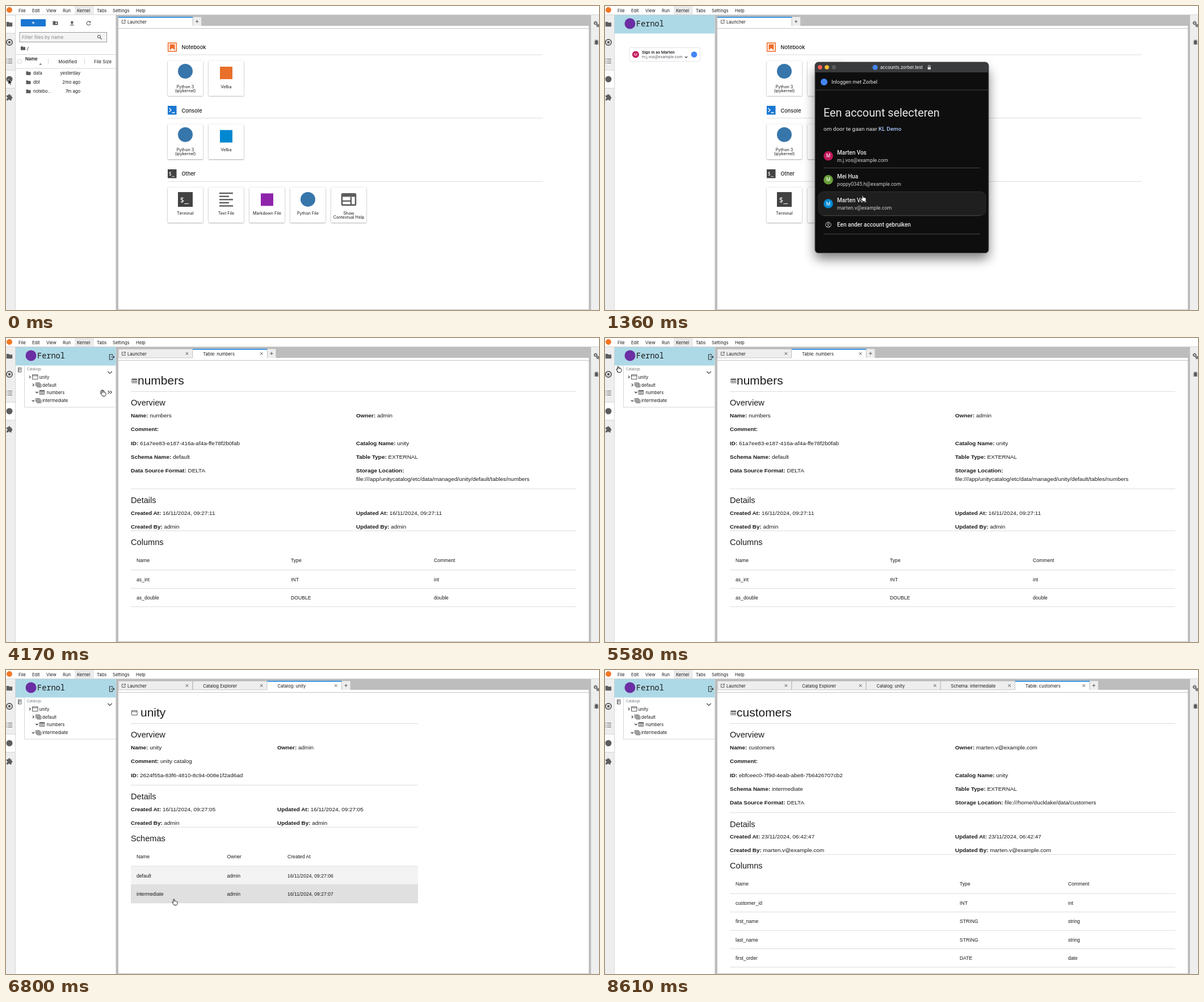
These frames come from a looping animation (1045 by 536 pixels, 8810 ms). An HTML page:

```html
<!DOCTYPE html>
<html lang="en">
<head>
<meta charset="utf-8">
<title>Catalog browser</title>
<style>
html, body { margin: 0; width: 100%; height: 100%; overflow: hidden; background: #fff; }
svg { display: block; width: 1045px; height: 536px; font-family: Inter, sans-serif; }
.doc { font-family: "Liberation Sans", Arial, sans-serif; }
.pop { font-family: Roboto, sans-serif; }
.mono { font-family: "Noto Sans Mono", monospace; }
</style>
</head>
<body>
<svg id="stage" viewBox="0 0 1045 536" xmlns="http://www.w3.org/2000/svg"></svg>
<script>
const LOOP = 8810;
const INK = '#1a1a1a', ICON = '#5c5c5c', GREY = '#bdbdbd', RULE = '#dcdcdc', BLUE = '#1976d2';
const UI = 7.65;

// y is the vertical centre of the text
const text = (x, y, s, size = UI, attrs = '') =>
  `<text x="${x}" y="${(y + size * .36).toFixed(2)}" font-size="${size}" fill="${INK}" ${attrs}>${s}</text>`;
const rect = (x, y, w, h, fill, attrs = '') =>
  `<rect x="${x}" y="${y}" width="${w}" height="${h}" fill="${fill}" ${attrs}/>`;
const dot = (x, y, r, fill, attrs = '') => `<circle cx="${x}" cy="${y}" r="${r}" fill="${fill}" ${attrs}/>`;
const line = (d, color = ICON, w = 1, attrs = '') =>
  `<path d="${d}" fill="none" stroke="${color}" stroke-width="${w}" ${attrs}/>`;
const fill = (d, color = ICON) => `<path d="${d}" fill="${color}"/>`;
const rule = (x, y, x2, color = RULE) => line(`M${x} ${y}H${x2}`, color);
const group = (body, attrs = '') => `<g ${attrs}>${body}</g>`;
const at = (x, y, body) => group(body, `transform="translate(${x} ${y})"`);
const MID = 'text-anchor="middle"', END = 'text-anchor="end"';

const folder = (x, y, k = 1) => group(
  fill('M-4.5 -3.5H-1L0 -2.4H4.5V3.6H-4.5Z'), `transform="translate(${x} ${y}) scale(${k})"`);
const chevron = (x, y, down, k = 1) =>
  at(x, y, line(down ? `M${-2.2 * k} ${-k}L0 ${1.2 * k}L${2.2 * k} ${-k}` : `M-1 -2.2L1.2 0L-1 2.2`, '#222', 1.05));
const cross = (x, y) => at(x, y, line('M-2.2 -2.2L2.2 2.2M2.2 -2.2L-2.2 2.2', '#444', .95));
const plus = (x, y, color, r = 2.6) => at(x, y, line(`M${-r} 0H${r}M0 ${-r}V${r}`, color));

const icons = {
  catalog: (x, y) => at(x, y, line('M-4.8 -4H4.8V4H-4.8ZM-4.8 -2H4.8', '#444', .9)),
  schema: (x, y) => at(x, y, line('M-4.5 2V-4H2.5M-3 3V-2.5H4', '#555', .8) +
    line('M-2 -1.5H4.8V4H-2ZM-2 .5H4.8M-2 2.3H4.8M1.4 -1.5V4', '#555', .8)),
  table: (x, y) => at(x, y, line('M-4.4 -3.4H4.4V3.6H-4.4ZM-1.5 -1.5V3.6M1.5 -1.5V3.6M-4.4 1H4.4', '#555', .8) +
    rect(-4.4, -3.6, 8.8, 2, '#555'))
};

function chrome() {
  const menu = [[22, 'File'], [46, 'Edit'], [71, 'View'], [100, 'Run'], [125, 'Kernel'], [160, 'Tabs'], [188, 'Settings'], [229, 'Help']];
  return rect(0, 0, 1045, 536, '#fff') + rect(121, 0, 34, 15, '#ebebeb') +
    dot(6, 7, 5, '#f37726') + menu.map(([x, s]) => text(x, 7.8, s)).join('') +
    rect(0, 15.5, 16.5, 521, '#eeeeee') + rect(16, 15.5, .8, 521, '#cfcfcf') +
    rect(193.5, 15.5, 4.5, 521, GREY) + rect(198, 15.5, 833, 19.5, GREY) +
    rect(1027, 15.5, 4, 521, GREY) + rect(1031, 15.5, 14, 521, '#eeeeee') +
    rule(198, 39.5, 1027, '#c4c4c4') + rule(198, 535.5, 1027, GREY) + rule(0, 15.5, 1045, '#d4d4d4');
}

const sideTab = (y, color) => rect(0, y, 16, 32, color) + rule(0, y, 16, '#d0d0d0') + rule(0, y + 32, 16, '#d0d0d0');

function sideIcons() {
  const gear = (x, y, r) => dot(x, y, r, 'none', `stroke="${ICON}" stroke-width="1.5"`) +
    dot(x, y, r + 1.1, 'none', `stroke="${ICON}" stroke-width="1" stroke-dasharray="1.2 1.4"`);
  return folder(6, 32, 1.15) +
    dot(6, 64, 5, '#fff', `stroke="${ICON}" stroke-width="2"`) + rect(3.9, 61.9, 4.2, 4.2, ICON) +
    line('M3.5 93.5H11M3.5 97H11M3.5 100.5H11', ICON, 1.2) + line('M.8 93.5H2.2M.8 97H2.2M.8 100.5H2.2', ICON, 1.2) +
    dot(6, 129, 5.5, ICON) +
    fill('M1 157.5H4A1.7 1.7 0 1 1 7.3 157.5H9.7V160A1.7 1.7 0 1 1 9.7 163.4V166.5H7A1.6 1.6 0 0 0 3.8 166.5H1V163.5A1.6 1.6 0 0 0 1 160.3Z') +
    gear(1039, 30, 2) + gear(1043, 34.5, 1.5) +
    fill('M1038 61.5Q1040.5 58.5 1043 61.5V66.5Q1040.5 70 1038 66.5Z') +
    line('M1036.5 62H1044.5M1036.5 64.5H1044.5M1036.5 67H1044.5M1038.5 59L1039.5 60.5M1042.5 59L1041.5 60.5', ICON, .9);
}

function filePanel() {
  const rows = [['data', 'yesterday'], ['dbt', '2mo ago'], ['notebo...', '7m ago']];
  return sideTab(16, '#fff') + sideTab(113, '#f8f8f8') +
    rect(26, 23.3, 44, 12.7, BLUE, 'rx="1"') + plus(48, 29.7, '#fff') +
    folder(87, 30) + plus(88.5, 30.4, '#fff', 1.6) +
    fill('M116.3 26L119.6 29.5H117.6V32H115V29.5H113ZM113 33H119.6V34.2H113Z') +
    line('M148 28.2A3.3 3.3 0 1 0 148.8 31.2', ICON, 1.1) + fill('M149.4 26.2V29.6H146Z') +
    rect(24, 46.5, 153.5, 17, '#f4f4f4', 'stroke="#9a9a9a" stroke-width="1"') +
    text(28, 55, 'Filter files by name', 8.2, 'style="fill:#858585"') +
    dot(164, 54, 2.5, 'none', `stroke="${ICON}" stroke-width="1.1"`) + line('M166 56L168.8 58.8', ICON, 1.2) +
    folder(30, 74.5, .9) + text(37, 74.5, '/', 8.5) + rule(17, 85.5, 193, '#d6d6d6') +
    rect(20.5, 94.5, 6.5, 6.5, '#fff', 'rx="1" stroke="#c8c8c8" stroke-width=".8"') +
    text(34, 93, 'Name', UI, 'font-weight="600"') + fill('M58.3 103.5H63.3L60.8 101Z') +
    text(125, 98.3, 'Modified', 7.85, END) + text(186, 98.3, 'File Size', 7.85, END) +
    line('M74.5 93V103M138.5 93V103', '#dadada') + rule(17, 110, 193, '#d6d6d6') +
    rows.map(([name, when], i) => {
      const y = 118.5 + 16 * i;
      return folder(39.5, y, .9) + text(48, y, name) + text(131, y, when, UI, END);
    }).join('');
}

const brand = () => sideTab(113, '#fff') + rect(17, 16, 176.5, 32.5, '#add8e6') +
  dot(44, 31, 9.5, '#6b2fa3') + text(55, 31.5, 'Fernol', 13.6, 'class="mono"');

const signIn = () => rect(43, 73.5, 124.5, 24, '#fff', 'rx="2" stroke="#dadce0" stroke-width=".8"') +
  dot(54, 85.5, 6, '#c2185b') + text(54, 85.6, 'M', 6.5, `${MID} style="fill:#fff"`) +
  group(text(65, 81.5, 'Sign in as Marten', 7.4, 'font-weight="500"') +
    text(65, 89.5, 'm.j.vos@example.com', 7.1, 'style="fill:#5f6368"'), 'class="pop"') +
  chevron(143, 90, true) + dot(157, 85.5, 5.3, '#4285f4');

function tree(level) {
  const bottom = [79, 108, 122][level];
  const lastY = level > 1 ? 110.5 : 96.5;
  let s = brand() + line('M187.5 31V29H182.5V38H187.5V36M185 33.5H190.5M188.5 31.3L190.8 33.5L188.5 35.7', '#333', 1.1) +
    line('M21.5 52.5H27V60H21.5ZM23 52.5V60M24.3 54.5H26M24.3 56.3H26', '#555', .9) +
    line(`M32.5 48.5V${bottom}H193`, '#d4d4d4') +
    text(37, 55.3, 'Catalogs', 6, 'style="fill:#757575"') + chevron(183, 60.5, true, 1.7) +
    chevron(42, 68.7, !level) + icons.catalog(51.3, 68.7) + text(58.5, 69, 'unity');
  if (level) s += chevron(48, 82.7, level < 2) + icons.schema(57, 82.7) + text(64, 82.8, 'default') +
    chevron(48, lastY, true) + icons.schema(57, lastY) + text(64, lastY, 'intermediate');
  if (level > 1) s += chevron(54.5, 95.7, true) + icons.table(63.5, 96) + text(71.5, 96, 'numbers');
  return s;
}

const rowTools = () => dot(170, 95.5, 3.6, 'none', 'stroke="#444" stroke-width="1"') +
  line('M168.5 94L171.5 97', '#444', .9) +
  line('M179.5 92.8L182.3 95.6L179.5 98.4M183.5 92.8L186.3 95.6L183.5 98.4', '#333', 1.1);

function tabs(names, active) {
  const all = ['Launcher', ...names];
  const end = 198 + 131.2 * all.length;
  return all.map((name, i) => {
    const x = 198 + 131.2 * i, on = i === active;
    return rect(x, 19.5, 130.7, on ? 16.5 : 15.5, on ? '#fff' : '#eeeeee', on ? '' : `stroke="${GREY}" stroke-width=".8"`) +
      (on ? rect(x, 19, 131, 1.7, '#1e88e5') : '') +
      (i ? '' : line('M207 25H204.5V30.5H210V28M207 28L210.2 24.8M208 24.7H210.3V27', '#555', .9)) +
      text(i ? x + 18 : 214, 27.8, name) + (names.length ? cross(x + 121, 27.5) : '');
  }).join('') + rect(end + .5, 19.5, 14.5, 15.5, '#eeeeee') + plus(end + 7.5, 27.3, '#555');
}

function launcher() {
  const python = dy => (x, y) => dot(x, y + dy, 13, '#3776ab');
  const badge = color => (x, y) => rect(x - 11, y - 11, 22, 22, color);
  const shell = (x, y) => rect(x - 13, y - 13.3, 26, 26, '#424242') + text(x - 9.5, y + .5, '$_', 13, 'class="mono" style="fill:#fff"');
  const lines = (x, y) => [24, 17, 24, 17, 24].map((w, i) => rect(x - 12, y - 12.5 + i * 5.6, w, 2.4, ICON)).join('');
  const help = (x, y) => rect(x - 12, y - 10, 24, 19.5, 'none', `rx="1.5" stroke="${ICON}" stroke-width="2.6"`) +
    rect(x - 12, y - 10, 24, 5, ICON) + line(`M${x - 12} ${y + 2.5}H${x + 4}M${x + 4} ${y - 5}V${y + 10}`, ICON, 2.4);
  const kernels = color => [['Python 3|(ipykernel)', python(-3)], ['Velba', badge(color)]];
  const files = [['Terminal', shell], ['Text File', lines], ['Markdown File', badge('#8e24aa')], ['Python File', python(-.5)], ['Show|Contextual Help', help]];
  const marks = [
    rect(285.7, 65.2, 14.6, 14.6, '#fff', 'stroke="#ef6c2a" stroke-width="1.6"') + fill('M288.5 67.5H297.5V78L293 74.3L288.5 78Z', '#ef6c2a'),
    rect(285, 176, 15.5, 15.5, BLUE) + line('M287.5 180L291 183.5L287.5 187M292.5 188H297.5', '#fff', 1.3),
    rect(285, 288, 15.5, 15.5, '#424242') + text(286.8, 296, '$_', 8.5, 'class="mono" style="fill:#fff"')
  ];
  return [['Notebook', kernels('#e8702a')], ['Console', kernels('#0288d1')], ['Other', files]].map(([name, cards], i) => {
    const y = 72.7 + 111.7 * i;
    return marks[i] + text(309.5, y, name, 9.2, 'font-weight="500"') + rule(285, y + 13.3, 946) +
      cards.map(([label, icon], j) => {
        const x = 316 + 72 * j;
        return rect(x - 31, y + 24, 62, 61.6, '#fff', 'rx="1" filter="url(#card)"') + icon(x, y + 45.3) +
          label.split('|').map((s, k) => text(x, y + 69.3 + 7.1 * k, s, 7.25, MID)).join('');
      }).join('');
  }).join('');
}

// Hoverable table rows, filled while the pages are built
const hovers = [];
function table(y, right, xs, head, rows, tint) {
  const cells = (list, cy) => list.map((s, i) => text(xs[i], cy, s, 8.65)).join('');
  return cells(head, y) + rule(220, y + 17, right) + rows.map((row, i) => {
    const top = y + 17 + 32.4 * i;
    let back = '';
    if (tint) {
      back = rect(220, top, right - 220, 32.4, '#e0e0e0', `id="row${hovers.length}" opacity="0"`);
      hovers.push({ id: 'row' + hovers.length, top, right, from: tint[0], to: tint[1] });
    }
    return back + cells(row, top + 16.4) + rule(220, top + 32.4, right);
  }).join('');
}

const title = (icon, s) => icons[icon](226.3, 75.5) + text(icon === 'table' ? 232 : 237, 74, s, 21);
const heading = (y, s) => text(220, y, s, 14.6);
const field = (x, y, key, val) => text(x, y, `<tspan font-weight="700">${key}:</tspan> ${val}`, 9.95);

function details(o) {
  const pair = (y, [a, b]) => (a ? field(220, y, ...a) : '') + (b ? field(o.x2, y, ...b) : '');
  const L = o.line;
  return group(title(o.icon, o.title) + rule(220, 94.5, o.right) + heading(114, 'Overview') +
    o.fields.map((f, i) => pair(136.3 + 24.4 * i, f)).join('') + (o.extra || '') +
    rule(220, L, o.right) + heading(L + 20, 'Details') +
    pair(L + 42, [['Created At', o.date], ['Updated At', o.date]]) +
    pair(L + 66.3, [['Created By', o.by], ['Updated By', o.by]]) +
    rule(220, L + 74, o.right) + heading(L + 93.5, o.section) +
    table(L + 126, o.right, o.xs, o.head, o.rows, o.tint), 'class="doc"');
}

const MAIL = 'marten.v@example.com', DAY = '16/11/2024, 09:27:';
const COLS = ['Name', 'Type', 'Comment'], LIST = ['Name', 'Owner', 'Created At'];
const tableFields = (name, owner, id, schema, place) => [
  [['Name', name], ['Owner', owner]], [['Comment', '']], [['ID', id], ['Catalog Name', 'unity']],
  [['Schema Name', schema], ['Table Type', 'EXTERNAL']], [['Data Source Format', 'DELTA'], ['Storage Location', place]]];

const numbersPage = () => details({
  icon: 'table', title: 'numbers', right: 1005, x2: 617, line: 266, date: DAY + '11', by: 'admin',
  fields: tableFields('numbers', 'admin', '61a7ee83-e187-416a-af4a-ffe78f2b0fab', 'default', ''),
  extra: text(617, 248.6, 'file:///app/unitycatalog/etc/data/managed/unity/default/tables/numbers', 9.95),
  section: 'Columns', xs: [230, 502, 754], head: COLS,
  rows: [['as_int', 'INT', 'int'], ['as_double', 'DOUBLE', 'double']]
});
const explorerPage = () => group(title('catalog', 'Catalog Explorer') + rule(220, 94.5, 726) + heading(114, 'Catalogs') +
  table(146, 726, [230, 389.5, 496], LIST, [['unity', 'admin', DAY + '05']], [5640, 6250]), 'class="doc"');
const catalogPage = () => details({
  icon: 'catalog', title: 'unity', right: 726, x2: 478, line: 203, date: DAY + '05', by: 'admin',
  fields: [[['Name', 'unity'], ['Owner', 'admin']], [['Comment', 'unity catalog']], [['ID', '2624f55a-83f6-4810-8c94-008e1f2ad6ad']]],
  section: 'Schemas', xs: [230, 389.5, 496], head: LIST, tint: [6250, 6920],
  rows: [['default', 'admin', DAY + '06'], ['intermediate', 'admin', DAY + '07']]
});
const schemaPage = () => details({
  icon: 'schema', title: 'intermediate', right: 851, x2: 540, line: 203, date: DAY + '07', by: 'admin',
  fields: [[['Name', 'intermediate'], ['Owner', 'admin']], [['Comment', '']], [['ID', '7c05d1be-29f4-4e63-9b1d-50a8e3c7f216'], ['Catalog Name', 'unity']]],
  section: 'Tables', xs: [230, 430, 600], head: ['Name', 'Type', 'Created At'], tint: [6920, 7620],
  rows: [['customers', 'EXTERNAL', '23/11/2024, 06:42:47'], ['orders', 'EXTERNAL', '23/11/2024, 06:42:48']]
});
const customersPage = () => details({
  icon: 'table', title: 'customers', right: 1005, x2: 617, line: 251.3, date: '23/11/2024, 06:42:47', by: MAIL,
  fields: tableFields('customers', MAIL, 'ebfceec0-7f9d-4eab-abe8-7b6426707cb2', 'intermediate', 'file:///home/ducklake/data/customers'),
  section: 'Columns', xs: [230, 625, 816], head: COLS,
  rows: [['customer_id', 'INT', 'int'], ['first_name', 'STRING', 'string'], ['last_name', 'STRING', 'string'], ['first_order', 'DATE', 'date']]
});

function popup() {
  const pale = (x, y, s, size, attrs = '', color = '#e8e8e8') => text(x, y, s, size, `${attrs} style="fill:${color}"`);
  const people = [['Marten Vos', 'm.j.vos@example.com', '#c2185b'], ['Mei Hua', 'poppy0345.h@example.com', '#689f38'], ['Marten Vos', MAIL, '#0288d1']];
  const body = pale(385, 187.5, 'Een account selecteren', 19.8) +
    pale(385, 216.3, 'om door te gaan naar <tspan style="fill:#a8c7fa" font-weight="500">KL Demo</tspan>', 9.95) +
    people.map(([name, mail, color], i) => {
      const y = 264.3 + 42.1 * i;
      return rect(376, y - 21, 295, 42, '#1f1f1f', `id="person${i}" rx="9" stroke="#333" stroke-width=".7"`) +
        dot(393.5, y, 8.3, color) + pale(393.5, y, name[0], 8.5, MID, '#fff') +
        pale(409, y - 6.3, name, 10, 'font-weight="500"') + pale(409, y + 7.5, mail, 8.9, '', '#d0d0d0') +
        rule(385, y + 21.2, 661, '#4a4a4a');
    }).join('') +
    dot(393.5, 385.7, 4.8, 'none', 'stroke="#ddd" stroke-width=".9"') + dot(393.5, 384.3, 1.6, 'none', 'stroke="#ddd" stroke-width=".9"') +
    line('M390.3 389Q393.5 386.2 396.7 389', '#ddd', .9) +
    pale(409, 385.7, 'Een ander account gebruiken', 10, 'font-weight="500"') + rule(385, 402, 661, '#4a4a4a');
  return rect(370, 112, 306, 334, '#000', 'rx="8" opacity=".5" filter="url(#soft)"') +
    rect(370, 99, 306, 336.5, '#0e0e0e', 'rx="6" stroke="#5a5a5a" stroke-width="1"') +
    fill('M370.5 117V105Q370.5 99.5 376 99.5H670Q675.5 99.5 675.5 105V117Z', '#3a3b3c') +
    dot(379, 108, 3.8, '#ff5f57') + dot(391, 108, 3.8, '#febc2e') + dot(403.3, 108, 3.8, '#5a5b5c') +
    dot(476, 108.3, 4.6, '#4285f4') + pale(485, 108.3, 'accounts.zorbel.test', UI, 'font-weight="500"') +
    rect(568.7, 107.5, 5.4, 4.4, '#ddd', 'rx=".6"') + line('M569.7 107.5V106A1.7 1.7 0 0 1 573.1 106V107.5', '#ddd', .9) +
    group(dot(386, 134, 6, '#4285f4') + pale(399, 133.5, 'Inloggen met Zorbel', 9.1) + rule(370.5, 148, 675.5, '#444') +
      group(body, 'id="choices"') + rect(370.5, 117, 0, 2, '#a8c7fa', 'id="progress"'), 'class="pop"');
}

const cardHover = () => line('M428.7 321V381.8H491.3V321', '#888', 1, 'opacity=".25"') + line('M430 382.6H490', '#888', 1.2, 'opacity=".4"');

const T2 = ['Catalog Explorer'], T3 = [...T2, 'Catalog: unity'], T4 = [...T3, 'Schema: intermediate'], T5 = [...T4, 'Table: customers'];

// [from, to, markup]; later entries lie on top
const layers = [
  [0, LOOP, chrome()],
  [0, 320, filePanel()],
  [320, 2460, brand()],
  [440, 2460, signIn()],
  [2460, 2940, tree(0)],
  [2940, 3240, tree(1)],
  [3240, LOOP, tree(2)],
  [0, LOOP, sideIcons()],
  [0, 4170, tabs([], 0) + launcher()],
  [2140, 2520, cardHover()],
  [4170, 5640, tabs(['Table: numbers'], 1) + numbersPage()],
  [5640, 6250, tabs(T2, 1) + explorerPage()],
  [6250, 6920, tabs(T3, 2) + catalogPage()],
  [6920, 7620, tabs(T4, 3) + schemaPage()],
  [7620, LOOP, tabs(T5, 4) + customersPage()],
  [1060, 2140, popup()]
];

const path = [
  [0, 4, 129], [700, 4, 129], [1000, 112, 84], [1080, 112, 84], [1360, 454, 334], [1540, 453, 335], [2400, 453, 335],
  [2460, 417, 334], [2900, 41, 67], [2960, 41, 67], [3180, 48, 81], [3300, 50, 79], [3840, 170, 92], [4430, 170, 92],
  [4830, 324, 350], [5280, 8, 62], [5560, 23, 50], [5680, 23, 50], [6190, 262, 176], [6300, 262, 176], [6680, 296, 390],
  [6800, 296, 404], [6980, 296, 404], [7110, 310, 396], [7170, 310, 396], [7560, 486, 360], [7680, 486, 360],
  [8040, 484, 306], [8170, 484, 306], [8290, 588, 420]
];
const handTimes = [[960, 1100], [1300, 2520], [2860, 4490], [5500, 5740], [6080, 6320], [6580, 7640]];
const within = (v, a, b) => v >= a && v < b;

function pointer(t) {
  const i = path.findIndex(p => p[0] > t);
  if (i < 1) return path[i < 0 ? path.length - 1 : 0].slice(1);
  const [t0, x0, y0] = path[i - 1], [t1, x1, y1] = path[i];
  const u = (t - t0) / (t1 - t0), e = u * u * (3 - 2 * u);
  return [x0 + (x1 - x0) * e, y0 + (y1 - y0) * e];
}

const stage = document.getElementById('stage');
stage.innerHTML = `<defs>
  <filter id="card" x="-20%" y="-20%" width="140%" height="140%"><feDropShadow dx="0" dy=".7" stdDeviation=".8" flood-color="#000" flood-opacity=".42"/></filter>
  <filter id="soft" x="-20%" y="-20%" width="140%" height="140%"><feGaussianBlur stdDeviation="10"/></filter></defs>` +
  layers.map(l => group(l[2], 'class="layer"')).join('') + group(rowTools(), 'id="tools"') +
  `<g id="cursor" stroke-linejoin="round">
    <path id="arrow" d="M0 0V9.2L2.1 7.3L3.6 10.6L5.1 9.9L3.7 6.7H6.6Z" fill="#000" stroke="#fff" stroke-width=".7"/>
    <path id="hand" d="M-1 1a1 1 0 0 1 2 0v2.6c.6-.5 1.6-.3 1.8.3.6-.4 1.5-.2 1.7.5.8-.2 1.5.3 1.5 1.1v1.8c0 1.8-.9 2.9-1.4 3.2H.2C-.6 9-2.2 7.2-2.9 6.1c-.5-.9.5-1.7 1.2-1.1l.7.6z" fill="#fff" stroke="#111" stroke-width=".95"/>
  </g>`;

const el = id => document.getElementById(id);
const show = (node, on) => { node.style.display = on ? '' : 'none'; };
const groups = [...document.querySelectorAll('.layer')];

function render(t) {
  layers.forEach(([from, to], i) => show(groups[i], within(t, from, to)));
  const [x, y] = pointer(t);
  const hand = handTimes.some(([a, b]) => within(t, a, b));
  el('cursor').setAttribute('transform', `translate(${x.toFixed(2)} ${y.toFixed(2)})`);
  show(el('cursor'), t < 8290);
  show(el('hand'), hand);
  show(el('arrow'), !hand);
  show(el('tools'), within(t, 3300, 4500) && within(y, 87, 103) && within(x, 33, 193));

  for (let i = 0; i < 3; i++) show(el('person' + i), within(y, 243.3 + 42.1 * i, 285.4 + 42.1 * i) && x > 376);
  el('choices').setAttribute('opacity', t < 1600 ? 1 : .5);
  el('progress').setAttribute('width', t < 1600 ? 0 : Math.min(305, (t - 1600) * .6));

  for (const h of hovers) {
    const inside = time => {
      const [px, py] = pointer(time);
      return within(time, h.from, h.to) && within(px, 220, h.right) && within(py, h.top, h.top + 32.4);
    };
    el(h.id).setAttribute('opacity', inside(t) ? 1 : inside(t - 200) ? .4 : 0);
  }
}

function tick() {
  render(performance.now() % LOOP);
  requestAnimationFrame(tick);
}
tick();
</script>
</body>
</html>
```
